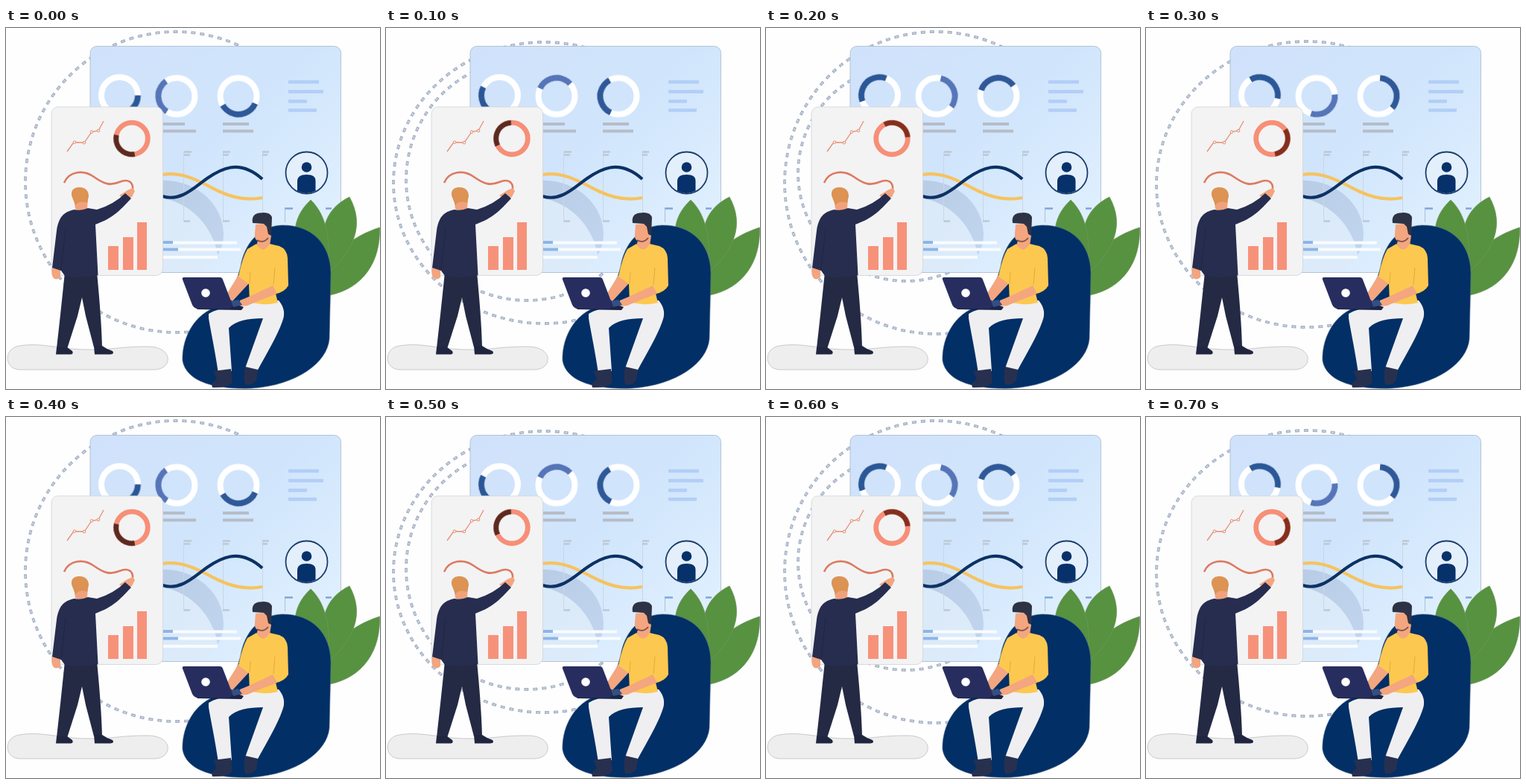
Animation, 502 px wide and 485 px high, one loop 800 ms. Source, as an HTML page:

```html
<!DOCTYPE html>
<html lang="en">
<head>
<meta charset="utf-8">
<title>Analytics presentation</title>
<style>
html, body { margin: 0; width: 100%; height: 100%; overflow: hidden; background: #fefefe; }
svg { display: block; width: 502px; height: 485px; }
.dial { fill: none; stroke-width: 8; }
.arc { transform-box: view-box; animation: turn 400ms step-end infinite; }
.warm { animation: turn 400ms step-end infinite, tint 400ms step-end infinite; }
@keyframes turn {
  0% { transform: rotate(var(--a)); }
  25% { transform: rotate(var(--b)); }
  50% { transform: rotate(var(--c)); }
  75%, 100% { transform: rotate(var(--d)); }
}
@keyframes tint {
  0% { stroke: #5a2a20; }
  50%, 100% { stroke: #842f1e; }
}
.orbit { fill: none; stroke: #a5b1c5; stroke-width: 3.8; stroke-dasharray: 6 6; }
.bead { stroke: #d0d9e6; stroke-width: 1.5; stroke-dasharray: 3 9; stroke-dashoffset: -1.5; }
.outer { animation: outer 400ms step-end infinite; }
.inner { animation: inner 400ms step-end infinite; }
@keyframes outer {
  0% { cx: 228px; cy: 207px; rx: 202px; ry: 202px; }
  25% { cx: 212px; cy: 208px; rx: 202px; ry: 189px; }
  50% { cx: 228px; cy: 208px; rx: 203px; ry: 203px; }
  75%, 100% { cx: 216px; cy: 210px; rx: 202px; ry: 192px; }
}
@keyframes inner {
  0% { cx: 189px; cy: 204px; rx: 162px; ry: 162px; opacity: 0; }
  25% { cx: 189px; cy: 204px; rx: 162px; ry: 162px; opacity: 1; }
  50% { cx: 188px; cy: 195px; rx: 145px; ry: 145px; opacity: 1; }
  75%, 100% { cx: 188px; cy: 195px; rx: 145px; ry: 145px; opacity: 0; }
}
</style>
</head>
<body>
<svg viewBox="0 0 502 485">
  <defs>
    <linearGradient id="sky" x1="0" y1="0" x2="1" y2="1">
      <stop offset="0" stop-color="#d0e2fb"/>
      <stop offset=".45" stop-color="#d0e5fc"/>
      <stop offset="1" stop-color="#e4f3ff"/>
    </linearGradient>
    <linearGradient id="moon" x1="0" y1="0" x2="1" y2="1">
      <stop offset="0" stop-color="#b9cce6"/>
      <stop offset="1" stop-color="#c2d5ee"/>
    </linearGradient>
  </defs>

  <!-- orbiting beads -->
  <ellipse class="orbit outer"/>
  <ellipse class="orbit bead outer"/>
  <ellipse class="orbit inner"/>
  <ellipse class="orbit bead inner"/>

  <!-- board -->
  <rect x="113" y="24.5" width="336.5" height="304" rx="9" fill="url(#sky)" stroke="#a9b7c9" stroke-width=".8"/>
  <path d="M205 205C256 202 292 238 292 277C292 288 289 298 284 305C278 269 250 234 205 228Z" fill="url(#moon)"/>
  <path d="M205 228C250 234 278 269 284 305Q274 322 255 328H205Z" fill="#deebf9" opacity=".8"/>

  <g class="dial">
    <g transform="translate(152.5 90.5)">
      <circle r="24.5" stroke="#fff"/>
      <circle class="arc" r="24.5" pathLength="360" stroke="#2a5797" stroke-dasharray="130 230" style="--a:0deg;--b:77deg;--c:161deg;--d:240deg"/>
    </g>
    <g transform="translate(229 91.5)">
      <circle r="24.5" stroke="#fff"/>
      <circle class="arc" r="24.5" pathLength="360" stroke="#5575b8" stroke-dasharray="113 247" style="--a:122deg;--b:205deg;--c:283deg;--d:355deg"/>
    </g>
    <g transform="translate(312 91.5)">
      <circle r="24.5" stroke="#fff"/>
      <circle class="arc" r="24.5" pathLength="360" stroke="#2f5898" stroke-dasharray="126 234" style="--a:24deg;--b:115deg;--c:199deg;--d:275deg"/>
    </g>
  </g>

  <path d="M211 129h29M211 138.500h44M291 129h35M291 138.500h41" stroke="#b6bdc8" stroke-width="4"/>
  <path d="M379 72.500h41M379 85.500h47M379 98.500h25M379 110.500h38" stroke="#b2cef7" stroke-width="4.400"/>
  <path d="M238.500 166v95M291.500 166v95M344.500 166v95" stroke="#c8d6e5" stroke-width="1"/>
  <path d="M239 166.500h10M239 170.500h8M291 166.500h10M291 170.500h8M344 166.500h9M344 170.500h7M239 259.500h8M291 259.500h9" stroke="#bcc8d6" stroke-width="2.400"/>
  <g fill="none" stroke-width="4.200">
    <path d="M210 197C240 192 264 209 285 219S325 232 344 228" stroke="#f6c35f"/>
    <path d="M210 226C235 234 254 213 270 202S312 174 344 203" stroke="#0c3264"/>
  </g>

  <circle cx="403.500" cy="194.500" r="28" fill="#e4effc" stroke="#1b3d6e" stroke-width="1.800"/>
  <circle cx="403.500" cy="187" r="6.800" fill="#07316a"/>
  <path d="M391 219V206Q391 197 403.500 197T415.500 206V219Q403 225 391 219Z" fill="#07316a"/>
  <path d="M374 242.500h11M429 242.500h8" stroke="#7fa5da" stroke-width="2.600"/>
  <path d="M374.500 243v18" stroke="#a9bfdc" stroke-width="1"/>

  <path d="M211 288.500h99M211 297.500h104M211 308h73" stroke="#f8fbff" stroke-width="4"/>
  <path d="M211 288h13M211 297.500h20" stroke="#8db5e6" stroke-width="4"/>

  <!-- front card -->
  <rect x="61" y="106" width="149.500" height="226.500" rx="9" fill="#f3f3f4" stroke="#d0d3d8" stroke-width=".8"/>
  <path d="M82 166L91 153.500L105 154L115 139.500L124 138L131 125" fill="none" stroke="#eb8d70" stroke-width="1.300"/>
  <g fill="#f2f2f4" stroke="#eb8d70">
    <circle cx="92" cy="153.500" r="1.800"/><circle cx="105" cy="154" r="1.800"/>
    <circle cx="115" cy="139.500" r="1.800"/><circle cx="124" cy="138" r="1.800"/>
  </g>
  <g class="dial" transform="translate(169 148.500)" style="stroke-width:6.800">
    <circle r="21.300" stroke="#f78f77"/>
    <circle class="arc warm" r="21.300" pathLength="360" stroke-dasharray="113 247" style="--a:80deg;--b:154deg;--c:242deg;--d:326deg"/>
  </g>
  <path d="M78 208C85 192 104 190 118 200S140 212 152 207S171 207 170 217" fill="none" stroke="#dd7a60" stroke-width="2.600"/>
  <path d="M137 293h14v32h-14zM157 281h14v44h-14zM176 261h13v64h-13z" fill="#f7927a"/>

  <!-- floor -->
  <path d="M18 427C50 422 70 432 110 432C140 433 150 428 190 428C225 428 224 458 200 459H17C-3 457 -3 430 18 427Z" fill="#eeeeef" stroke="#b6b7ba" stroke-width=".7"/>

  <!-- presenter -->
  <path d="M152 225L163 218L170 215L173 219L169 227L161 231Z" fill="#f2a57f"/>
  <path d="M62 321L73 324L73 335Q67 340 63 335Q60 330 62 321Z" fill="#f2a57f"/>
  <path d="M91 228H110L109 243Q101 249 93 243Z" fill="#f0a27c"/>
  <path d="M88 225C87 216 93 214 99 214C107 214 111 219 111 226L109 235Q99 231 93 238Z" fill="#dc9353"/>
  <path d="M68 430L73 385L79 328H122Q128 390 129 429H118L107 387L102 362L96 387L82 431Z" fill="#242a44"/>
  <path d="M92 244C77 247 71 254 68 272L62 322L74 326L79 333Q100 337 123.500 332L120 264C144 255 152 246 168 229L160 222Q145 237 122 244L110 242Q101 246 92 244Z" fill="#262d4f"/>
  <path d="M80 270L74 325" stroke="#1f2643" stroke-width="1"/>
  <path d="M68 429H82L89 434Q91 438 87 438.500H67ZM118 427H129Q136 432 143 434Q146 438 140 438.500H119Z" fill="#20263f"/>

  <!-- plant -->
  <g fill="#569240" stroke="#6f965e" stroke-width=".8">
    <path d="M501.500 268C465 280 440 300 434 330V359C480 350 503 313 501.500 268Z"/>
    <path d="M461 227C435 240 421 262 427 300L436 326C466 298 482 265 461 227Z"/>
    <path d="M409 231C396 243 388 258 388 275L432 326C436 290 432 253 409 231Z"/>
  </g>

  <!-- armchair -->
  <path d="M370 265C410 264 436 290 436 330L434 418C431 450 390 480 330 484C280 486 242 475 237 447C236 422 248 389 279 376C299 362 309 345 315 320C320 290 340 266 370 265Z" fill="#022f66" stroke="#51698a" stroke-width=".6"/>

  <!-- seated worker -->
  <path d="M335 264L356 262V279L354 292Q345 304 336 292L338 286Q333 284 334 276Z" fill="#f3a67f"/>
  <path d="M337 285Q345 290 352 282" fill="none" stroke="#7c5148" stroke-width="1.800"/>
  <path d="M331 262Q329 250 340 248.500Q354 246 357 254L356 279L352 277L350 267L346 263Z" fill="#2d3245"/>
  <path d="M312 332L327 342L304 367L294 361Z" fill="#f3a67f"/>
  <path d="M272 384C288 374 322 372 328 364L366 366Q377 379 371 394C364 414 350 437 337 461L321 457L345 390C325 390 309 393 299 403L303 461L285 464C281 436 275 408 272 390Z" fill="#efeff1"/>
  <path d="M336 290Q345 305 354 290L367 293Q377 297 378 309L379 346Q374 355 362 357L365 369Q345 374 327 368L326 344L312 334Q317 309 324 297Z" fill="#fdc850"/>
  <path d="M361 322L359 345M327 343L328 328" fill="none" stroke="#e3ab3b" stroke-width="1"/>
  <path d="M358 346L364 357Q342 365 324 373L313 374L314 366L326 361Z" fill="#f3a67f"/>
  <path d="M278 461L302 458L304 476Q297 484 277 483Q274 477 283 472ZM321 455L338 459L336 473Q331 481 321 479Q318 468 321 455Z" fill="#27304f"/>

  <!-- laptop -->
  <path d="M253 374L303 369L319 375L316 379L257 378Z" fill="#1b2448"/>
  <path d="M302 367L312 365L317 372L305 375Z" fill="#334f83"/>
  <path d="M239 335H287Q290 335 291 338L304 372Q303 376 299 377L256 377Q252 376 250 372L237 338Q236 335 239 335Z" fill="#272e5f"/>
  <circle cx="268" cy="356" r="5.800" fill="#fff"/>
</svg>
</body>
</html>
```
